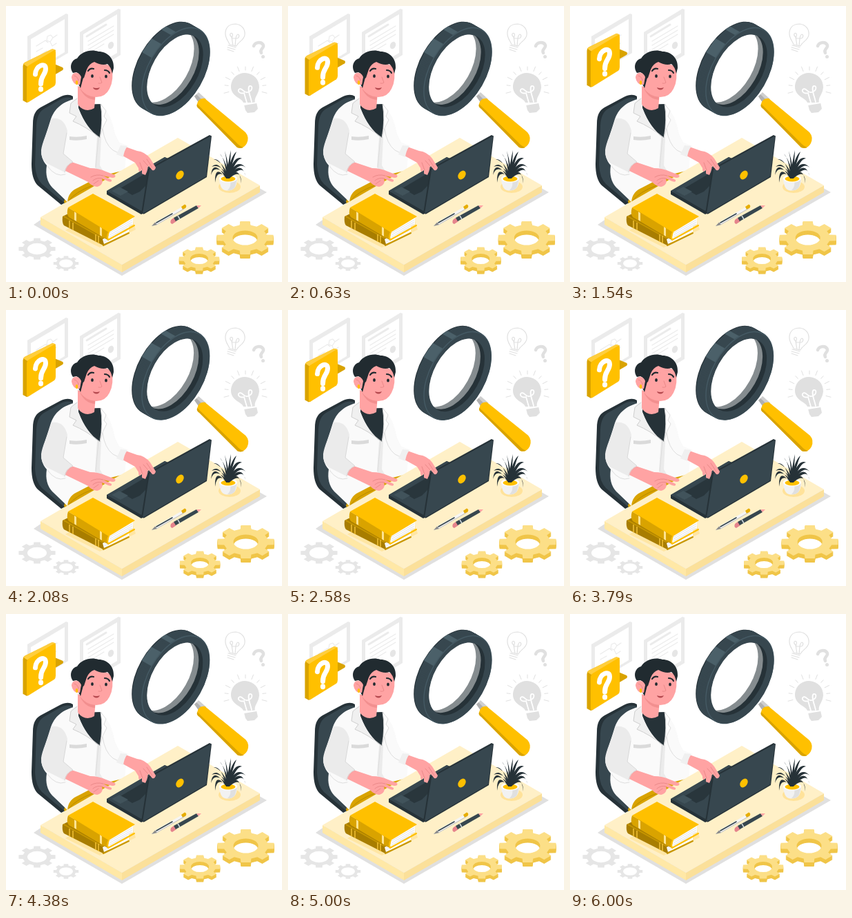
Animation, 400 px wide and 400 px high, one loop 6.04 s. Source, as an HTML page:

```html
<!DOCTYPE html>
<html lang="en">
<head>
<meta charset="utf-8">
<title>Research desk</title>
<style>
html, body { margin: 0; height: 100%; overflow: hidden; background: #fff; }
svg { display: block; width: 100vw; height: 100vh; }
.line { fill: none; stroke-linecap: round; stroke-linejoin: round; }
.skin { fill: #ffa3a3; }
.crease { stroke: #e88686; stroke-width: .9; }
</style>
</head>
<body>
<svg viewBox="0 0 400 400">
  <!-- wall frames -->
  <g fill="#ebebeb">
    <path d="M31 44L87 11L90 12V68L34 101L31 100Z"/>
    <path d="M107 38L163 4L166 5V71L110 104L107 103Z"/>
    <path d="M36 48L85 19V67L36 96ZM112 41L161 12V68L112 97Z" fill="#fff"/>
  </g>
  <g class="line" stroke="#ebebeb" stroke-width="1.2">
    <path d="M44 58L57 50M44 66L53 61M60 44l5 -2l3 4l-4 6l-5 -2zM68 46l6 -4M57 50l4 3M64 52l3 6l6 -4M51 70l8 -5"/>
    <path d="M117 44L145 27" stroke-width="3"/>
    <path d="M119 51L156 29M119 57L156 35M119 63L156 41M119 69L142 55"/>
  </g>
  <ellipse cx="152" cy="57" rx="4" ry="5.5" transform="rotate(20 152 57)" fill="#e6e6e6"/>

  <!-- bulbs and question mark -->
  <g class="line" stroke="#e0e0e0" stroke-width="1.2">
    <path d="M324 56C323 51 317 47 318 38C319 30 325 26 333 26C342 27 347 34 346 42C345 50 336 52 334 58Z"/>
    <path d="M322 57L333 60M321 60L332 63M321 63L330 66M329 57L327 45C323 42 325 38 328 40C330 43 326 46 328 47L334 47C338 47 339 42 336 41C333 42 333 47 332 58"/>
    <path d="M359 58C361 52 371 51 373 57C374 62 367 62 370 68" stroke-width="4.5"/>
  </g>
  <circle cx="372.5" cy="73.5" r="2.5" fill="#e0e0e0"/>
  <g fill="#e0e0e0">
    <path d="M344 140C343 134 327 132 326 118C326 105 335 97 347 97C360 98 367 107 367 118C366 129 359 132 361 140Z"/>
    <path d="M345 143L363 140L365 149L360 154L350 155L347 151Z"/>
  </g>
  <path class="line" stroke="#fff" stroke-width="1.8" d="M349 140L345 126C338 128 334 122 339 120C344 120 344 126 350 125C358 123 358 115 353 116C349 119 354 130 356 139M345 143L363 140"/>
  <g id="rays" stroke="#e0e0e0" stroke-linecap="round"></g>
  <g id="grayGears"></g>

  <!-- speech bubble -->
  <g id="bubble">
    <path d="M70 84L82 89Q84 91 82 93L70 100Z" fill="#d9a300"/>
    <path d="M24.5 87Q24.500 84 27 82L67 62.500L72 64L33 139L30 140L24.5 137Z" fill="#d9a300"/>
    <path d="M25 84Q26 82 28 81.500L66 62.500Q69 61.500 72 64L31 88Z" fill="#ffce3d"/>
    <path d="M30 91Q30 88 33 86L69 64.500Q72 63 72 67V111Q72 114 70 116L33 139Q30 140 30 137Z" fill="#ffc000"/>
    <path class="line" stroke="#fff" stroke-width="7" stroke-linecap="butt" d="M42.5 99C43 86 57.500 81 57.500 91C57.500 100 50 101 50.500 113"/>
    <ellipse cx="50.5" cy="120.500" rx="3.6" ry="4" fill="#fff"/>
  </g>

  <!-- chair -->
  <path d="M97 131Q90 126 78 132L50 147Q39 153 39 170L37 229Q37 251 46 260L80 288L94 281L97 255Z" fill="#263238"/>
  <path d="M97 134Q88 130 78 136L55 149Q45 155 44 173L42 230Q43 249 52 258L84 285L95 279Z" fill="#37474f"/>

  <!-- body -->
  <path d="M84 284Q87 270 104 262L132 247L165 238L176 246L90 297Z" fill="#d9a300"/>
  <path d="M91 282Q101 269 126 260L160 250" class="line" stroke="#b88a00"/>
  <path d="M101 134C83 139 70 147 64 167L53 202Q48 219 59 231Q56 251 67 263L89 284Q90 269 105 263L128 251L143 245L172 238L174 218L158 185Q153 162 147 155L139 144Z" fill="#fafafa"/>
  <path d="M132 190L129 232L134 250L144 245L136 231L138 190Z" fill="#ebebeb"/>
  <path d="M139 160Q143 190 152 205Q159 213 171 216L177 203L161 196L151 166Q147 150 139 146Z" fill="#fafafa"/>
  <path class="line" stroke="#dedede" d="M140 178Q143 200 155 209L171 217M134 191L130 234M60 232Q72 249 86 244"/>
  <path d="M92 189Q104 191 117 188V193Q104 196 92 194Z" fill="#dadada"/>
  <path d="M105 143L138 142Q142 164 136 191Q117 180 105 148Z" fill="#263238"/>
  <path d="M104 116L130 126L128 148Q115 156 104 143Z" class="skin"/>
  <path d="M107 119Q115 131 129 131L129 136Q114 135 107 119Z" fill="#f28f8f"/>
  <path d="M103 134L94 141L92 155L102 160L97 167Q114 174 136 191Q116 177 105 148Z" fill="#f0f0f0"/>
  <path class="line" stroke="#cfcfcf" d="M103 134L94 141L92 155L102 160L97 167Q116 175 135 190"/>
  <path d="M137 142L145 152L142 160L146 165Q139 176 136 191Q141 164 137 142Z" fill="#fff" stroke="#d6d6d6" stroke-width=".8"/>

  <!-- head -->
  <path class="skin" d="M105 100C105 85 119 80 132 81L153 87Q157 107 150 120Q144 132 131 132Q113 131 107 116Z"/>
  <path d="M101 106L108 119L112 104Z" fill="#212b30"/>
  <path d="M97 97C91 88 95 78 103 76C109 66 123 62 134 66C147 66 157 76 156 90L154 98Q152 88 147 84Q139 87 128 81Q120 84 117 92L113 104L108 107Q108 98 102 96Z" fill="#212b30"/>
  <path class="skin" d="M109 103C106 94 95 95 95 104Q97 115 107 114Z"/>
  <path class="line crease" d="M99 101Q104 102 105 108M136 103L139 111Q137 113 134 112"/>
  <ellipse cx="102.5" cy="111" rx="1.7" ry="3" fill="#ffc000"/>
  <path class="line" stroke="#212b30" stroke-width="2.2" d="M119 94Q122 89.500 127 91M143 93Q148 93 150 97"/>
  <ellipse cx="125" cy="101.5" rx="1.9" ry="2.6" fill="#212b30"/>
  <ellipse cx="145" cy="102" rx="1.9" ry="2.6" fill="#212b30"/>
  <path d="M126 118Q131 120 136 118Q133 124 127 120Z" fill="#b54a50"/>

  <!-- desk -->
  <path d="M40 317L168 391L378 270L362 261L168 370L56 306Z" fill="#e0e0e0"/>
  <path d="M50 306L168 375V386L50 317Z" fill="#ffe8a6"/>
  <path d="M168 375L368 260V270L168 386Z" fill="#fbe09a"/>
  <path d="M50 306L249 191L368 260L168 375Z" fill="#fff0c7"/>
  <path d="M86 325L136 350L188 324L184 312L130 300Z" fill="#ffe6a3"/>

  <!-- laptop -->
  <path d="M146 268L230 219L244 225L280 240L196 302L146 273Z" fill="#263238"/>
  <path d="M146 268L230 219L276 240L196 297Z" fill="#37474f"/>
  <path d="M166 264L215 235L222 241L194 269L183 274Z" fill="#29363c"/>
  <path d="M153 268L164 262L177 269L166 275Z" fill="#41535b"/>
  <path d="M206 236L295 187L298 188.500L291 248L200 301.500L196 301Z" fill="#263238"/>
  <path d="M208 237L297 188.500L290 247L198 301Z" fill="#37474f"/>
  <ellipse cx="252" cy="245" rx="5" ry="7" transform="rotate(35 252 245)" fill="#ffc000"/>

  <!-- sleeves and hands -->
  <path class="skin" d="M173 204L190 210Q201 211 209 221L217 234Q216 239 212 238L206 231L205 237Q204 241 202 245L197 243L197 237Q192 244 192 235L187 227L169 217Z"/>
  <path class="line crease" d="M199 224L206 232M194 227L198 238M204 222L212 234"/>
  <path d="M166 202L176 203Q171 210 170 219L160 215Z" fill="#f0f0f0"/>
  <path class="skin" d="M89 224L122 235Q134 235 145 240L158 245Q160 249 154 249L141 246L153 252Q154 256 148 254L139 250Q142 259 132 262Q124 261 119 255L84 238Z"/>
  <path class="line crease" d="M123 248Q131 243 141 246M126 253Q132 248 139 250M127 258L134 253"/>
  <path d="M66 163C60 182 52 199 51 209Q50 221 59 228L85 241Q86 230 97 226L83 214L89 181Q84 160 66 163Z" fill="#ebebeb"/>
  <path class="line" stroke="#d9d9d9" d="M88 184L83 214L97 226Q87 230 85 241"/>

  <!-- books -->
  <path d="M82 305L120 286L178 320L141 347L84 318Q81 315 82 305Z" fill="#a87d00"/>
  <path d="M140 338L178 319V327L142 345Z" fill="#fff"/>
  <path class="line" stroke="#d6d6d6" stroke-width=".7" d="M142 339L176 322M142 342L176 325"/>
  <path class="line" stroke="#c79600" stroke-width="2" d="M84 305L139 336L178 317M141 347L178 329"/>
  <path d="M92 311V322M97 314V325M130 331V342M134 333V344" stroke="#f7c53b" stroke-width="1.4"/>
  <path d="M90 292Q87 301 91 306L147 339Q146 332 149 327Z" fill="#d9a300"/>
  <path d="M149 327L184 306V316L148 337Z" fill="#fff"/>
  <path class="line" stroke="#d6d6d6" stroke-width=".7" d="M150 329L183 310M150 332L183 313M150 335L182 316"/>
  <path d="M90 292L126 272L187 305L149 328Z" fill="#ffc000"/>
  <path class="line" stroke="#ffc000" stroke-width="2" d="M149 328Q146 333 148 339L186 318"/>
  <path d="M99 298V310L102 312V300ZM136 320V332L139 334V322Z" fill="#ffe391"/>

  <!-- pen and pencil -->
  <path d="M211 319L217 313L257 290L260 293L219 317Z" fill="#f5f5f5"/>
  <path d="M211 319L216 313.500L219 317Z" fill="#8a8a8a"/>
  <path d="M254 291L259 287.500Q263 289 260 293L256 295Z" fill="#e6ad00"/>
  <path class="line" stroke="#37474f" stroke-width="1.6" d="M218 314L241 301"/>
  <path class="line" stroke="#bdbdbd" d="M218 317L258 294"/>
  <path d="M239 310L243 307L247 312L241 316Q237 315 239 310Z" fill="#e5848c"/>
  <path d="M243 307L276 289L279 293L246 312Z" fill="#37474f"/>
  <path d="M276 289L283 289L279 293Z" fill="#ffa3a3"/>
  <path d="M249 304L252 309" stroke="#cfd8dc" stroke-width="1.5"/>

  <!-- plant -->
  <ellipse cx="324" cy="262" rx="16" ry="9" fill="#ffe29a"/>
  <path d="M309 250Q310 265 317 267Q325 269 331 264Q335 259 335 250Z" fill="#f2f2f2"/>
  <path d="M325 251Q327 262 321 267Q329 268 332 262L335 250Z" fill="#e0e0e0"/>
  <ellipse cx="322" cy="250" rx="13" ry="5.5" fill="#fff"/>
  <ellipse cx="322" cy="250.5" rx="10.5" ry="4" fill="#ffc000"/>
  <g id="leaves" fill="#263238"></g>

  <!-- magnifier -->
  <g id="magnifier">
    <path d="M273 131L279 125L290 135L282 144Z" fill="#cfcfcf"/>
    <path d="M273 131L276 128L287 139L282 144Z" fill="#b0b0b0"/>
    <path d="M277 142Q279 133 288 134L347 183Q353 190 349 199Q344 208 335 205L280 149Q276 146 277 142Z" fill="#ffc000"/>
    <path d="M277 142Q275 146 280 149L335 205Q340 207 344 205Q338 203 334 198L281 146Z" fill="#d9a300"/>
    <g id="rim"></g>
  </g>

  <g id="gears"></g>
</svg>
<script>
const $ = id => document.getElementById(id);
const { sin, cos, PI } = Math;

// Isometric gear: eight tapered teeth and an elliptical hole.
function gearPath(cx, cy, r, hole, n = 8) {
  const pt = (a, q) => `${(cx + q * cos(a)).toFixed(1)} ${(cy + q * .585 * sin(a)).toFixed(1)}`;
  const pts = [];
  for (let i = 0; i < n; i++) {
    const a = i * 2 * PI / n, w = PI / n;
    pts.push(pt(a - w * .62, r * .78), pt(a - w * .44, r), pt(a + w * .44, r), pt(a + w * .62, r * .78));
  }
  const h = hole * .585;
  return `M${pts.join('L')}ZM${cx - hole} ${cy}a${hole} ${h} 0 1 0 ${2 * hole} 0a${hole} ${h} 0 1 0 ${-2 * hole} 0Z`;
}

function gear(cx, cy, r, hole, top, side, depth) {
  let s = '';
  for (let i = depth; i >= 0; i--)
    s += `<path fill-rule="evenodd" fill="${i ? side : top}" d="${gearPath(cx, cy + i, r, hole)}"/>`;
  return s;
}

$('grayGears').innerHTML =
  gear(45, 352, 27, 14, '#e6e6e6', '', 0) + gear(87, 373, 18.5, 10, '#e6e6e6', '', 0);
$('gears').innerHTML =
  gear(346.5, 336, 41.5, 18, '#fcdf87', '#f0c548', 6) + gear(280, 366.5, 29.5, 13, '#fcdf87', '#f0c548', 5);

// Rays around the large bulb.
let rays = '';
for (let i = 0; i < 11; i++) {
  const a = (165 + i * 21) * PI / 180, u = cos(a), v = sin(a), len = i % 2 ? 5 : 7;
  rays += `<path d="M${347 + 25 * u} ${118 + 25 * v}l${len * u} ${len * v}"/>`;
}
$('rays').innerHTML = rays;

// Each thin leaf arches from the pot over a bend to its tip.
const leaves = [
  [303, 230, 303, 256], [301, 222, 297, 245], [310, 224, 298, 233], [313, 222, 301, 222],
  [319, 224, 310, 214], [322, 228, 317, 210], [323, 226, 326, 209], [326, 220, 334, 211],
  [331, 217, 342, 221], [335, 221, 347, 234], [342, 223, 347, 246], [339, 230, 341, 257]
];
$('leaves').innerHTML = leaves.map(([bx, by, x, y]) =>
  `<path d="M319.500 250Q${bx - 1} ${by - 2} ${x} ${y}Q${bx + 2} ${by + 4} 323.500 250Z"/>`).join('');

// Magnifier rim: circles on an upright isometric plane, swept back along its normal.
const disc = (dx, dy, r, fill) =>
  `<circle r="${r}" transform="matrix(.866 -.5 0 1 ${246 + dx} ${95 + dy})" fill="${fill}"/>`;
let rim = '';
for (let i = 14; i > 0; i--) rim += disc(-i, -i * .577, 57.5, i > 13 ? '#263238' : '#37474f');
rim += '<path d="M211 75L197 67L211 47L225 55ZM239 42L225 34L232 29.500L246 37.500Z" fill="#4b6069"/>';
rim += disc(0, 0, 57.5, '#455a64') + disc(.5, .5, 56.5, '#37474f');
rim += `<clipPath id="hole">${disc(-1, -1, 47, '#000')}</clipPath>
  <g clip-path="url(#hole)">${disc(-1, -1, 48, '#263238')}${disc(-7, -4.5, 47, '#858c8f')}${disc(-15, -9, 48, '#fff')}</g>`;
$('rim').innerHTML = rim;

// Linear interpolation through [time, value] pairs.
function track(keys, t) {
  const i = keys.findIndex(k => k[0] > t);
  if (i < 0) return keys[keys.length - 1][1];
  const [t0, v0] = keys[i - 1], [t1, v1] = keys[i];
  return v0 + (v1 - v0) * (t - t0) / (t1 - t0);
}
const sway = [[0, 0], [630, -.7], [1540, -1.8], [2200, 1.7], [2580, 1], [3450, 1.8], [3790, 1.2], [5000, .9], [6000, 0]];
const tilt = [[0, 0], [1540, 0], [2580, -.9], [3790, -.7], [5000, -.2], [6000, 0]];

function draw(now) {
  const t = now % 6040, p = t % 3000 / 1500;
  $('bubble').setAttribute('transform', `translate(0 ${-23 * (1 - Math.abs(1 - p))})`);
  $('gears').setAttribute('transform', `translate(${track(sway, t)} 0)`);
  $('magnifier').setAttribute('transform', `rotate(${track(tilt, t)} 266 115)`);
  requestAnimationFrame(() => draw(performance.now() - start));
}
const start = performance.now();
draw(0);
</script>
</body>
</html>
```
